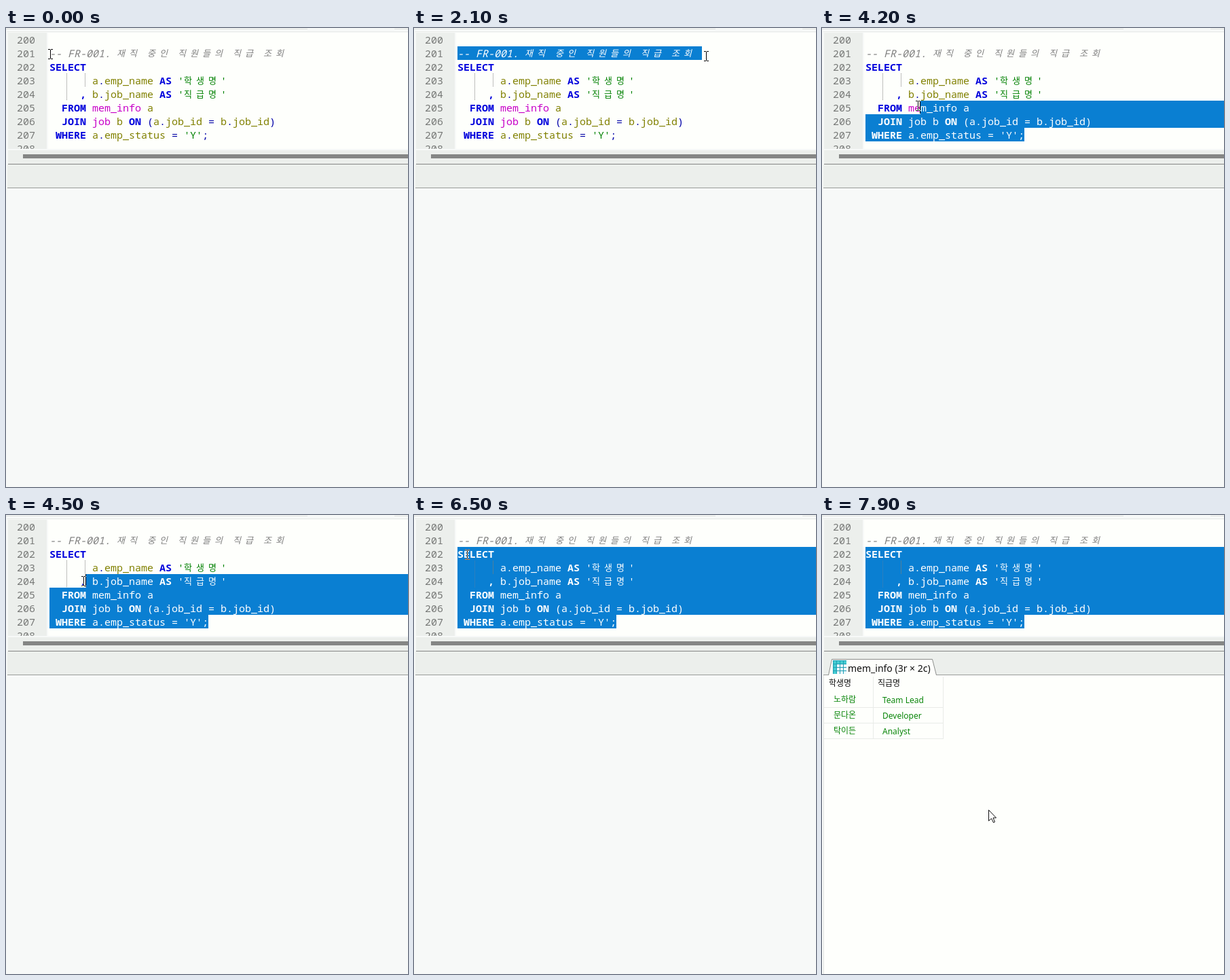
An HTML page with a canvas that plays this animation: 592 by 676 pixels, repeating every 8000 ms.

```html
<!DOCTYPE html>
<html lang="ko">
<head>
<meta charset="utf-8">
<style>
html, body { margin: 0; width: 100%; height: 100%; overflow: hidden; background: #f7f9f8; }
canvas { display: block; }
</style>
</head>
<body>
<canvas id="stage" width="592" height="676"></canvas>
<script>
const ctx = document.getElementById('stage').getContext('2d');
const W = 592, H = 676, LOOP = 8000, STEP = 100;
const LEFT = 64, TOP = 27, CELL = 9, ROW = 20;
const PAPER = '#fefffc', PANEL = '#ecefec', PAGE = '#f7f9f8', BLUE = '#0a7fd2';
const MONO = '"Noto Sans Mono", monospace';
const HANGUL = '"Noto Sans CJK KR", "Noto Sans CJK", sans-serif';
const SANS = '"Noto Sans", "Noto Sans CJK KR", sans-serif';

const code = [
  '-- FR-001. 재직 중인 직원들의 직급 조회 ',
  'SELECT',
  "       a.emp_name AS '학생명'",
  "     , b.job_name AS '직급명'",
  '  FROM mem_info a',
  '  JOIN job b ON (a.job_id = b.job_id)',
  " WHERE a.emp_status = 'Y';"
];
const rows = [['노하람', 'Team Lead'], ['문다온', 'Developer'], ['탁이든', 'Analyst']];

// Pointer stops: time, x, y
const path = [
  [0, 65, 38], [600, 65, 38], [1800, 421, 39], [2000, 430, 41],
  [2650, 430, 41], [3150, 330, 160], [3650, 330, 160], [4200, 141, 114],
  [5000, 57, 59], [5600, 57, 59], [6200, 78, 58], [7250, 78, 58],
  [7800, 245, 434], [LOOP, 245, 434]
];
const CLICK = 3150, DRAG = 3650, DRAG_END = 5000, RESULT = 6900;

const isWide = ch => ch >= '가' && ch <= '힣';
const cols = s => [...s].reduce((n, ch) => n + (isWide(ch) ? 2 : 1), 0);

function box(x, y, w, h, color) {
  ctx.fillStyle = color;
  ctx.fillRect(x, y, w, h);
}

function text(s, x, y, font, color) {
  ctx.font = font;
  ctx.fillStyle = color;
  ctx.fillText(s, x, y);
}

function pointer(t) {
  const i = Math.max(1, path.findIndex(p => p[0] >= t));
  const [t0, x0, y0] = path[i - 1], [t1, x1, y1] = path[i];
  let k = (t - t0) / (t1 - t0);
  k = k * k * (3 - 2 * k);
  return { x: x0 + (x1 - x0) * k, y: y0 + (y1 - y0) * k };
}

function caretAt({ x, y }) {
  const row = Math.max(0, Math.min(code.length - 1, Math.floor((y - TOP) / ROW)));
  const col = Math.max(0, Math.min(cols(code[row]), Math.round((x - LEFT) / CELL)));
  return { row, col };
}

function selection(t) {
  if (t < CLICK) return { from: { row: 0, col: 0 }, to: caretAt(pointer(Math.min(t, 2600))) };
  if (t < DRAG) return null;
  return { from: caretAt(pointer(Math.min(t, DRAG_END))), to: { row: 6, col: 26 } };
}

function style(token) {
  if (token.startsWith('--')) return ['italic', '#808080'];
  if (token[0] === "'") return ['', '#008000'];
  if (/^(SELECT|AS|FROM|JOIN|ON|WHERE)$/.test(token)) return ['bold', '#0000dc'];
  if (/^(mem_info|job)$/.test(token)) return ['', '#c800c8'];
  if (token === ',') return ['bold', '#0000dc'];
  return /\w/.test(token) ? ['', '#808000'] : ['', '#0000a8'];
}

function drawLine(row, selected) {
  const line = code[row], base = TOP + ROW * row + 16;
  for (const m of line.matchAll(/--.*|'[^']*'|\w+|\S/g)) {
    const [face, color] = style(m[0]);
    let x = LEFT + CELL * cols(line.slice(0, m.index));
    for (const ch of m[0]) {
      const wide = isWide(ch);
      text(ch, x, base - (wide ? 1 : 0), face + (wide ? ' 13px ' + HANGUL : ' 15px ' + MONO), selected ? '#fff' : color);
      x += wide ? 2 * CELL : CELL;
    }
  }
}

function guide(x, y, h) {
  for (let i = 0; i < h; i += 2) box(x, y + i, 1, 1, '#808080');
}

function drawSelection({ from, to }) {
  for (let r = from.row; r <= to.row; r++) {
    const x0 = LEFT + CELL * (r === from.row ? from.col : 0);
    const x1 = r === to.row ? LEFT + CELL * to.col : W;
    if (x1 <= x0) continue;
    ctx.save();
    ctx.beginPath();
    ctx.rect(x0, TOP + ROW * r, x1 - x0, ROW);
    ctx.clip();
    box(x0, TOP + ROW * r, x1 - x0, ROW, BLUE);
    if (r === 2 || r === 3) box(89, TOP + ROW * r, 1, ROW, '#2b7fc0');
    if (r === 2) box(116, TOP + ROW * r, 1, ROW, '#4c7f9c');
    drawLine(r, true);
    ctx.restore();
  }
}

function drawEditor(t) {
  box(62, 7, W - 62, 171, PAPER);
  box(3, 7, 57, 171, PANEL);
  ctx.save();
  ctx.beginPath();
  ctx.rect(0, 7, W, 171);
  ctx.clip();
  for (let i = 0; i < 9; i++) text(String(200 + i), 16, 23 + ROW * i, '15px ' + MONO, '#777977');
  guide(89, 67, 40);
  guide(116, 67, 20);
  code.forEach((_, r) => drawLine(r, false));
  const sel = selection(t);
  if (sel) {
    drawSelection(sel);
    const up = t > DRAG && t < DRAG_END, right = t > 600 && t < 1800;
    const at = up ? sel.from : right ? sel.to : null;
    if (at) box(LEFT + CELL * at.col - 1, TOP + ROW * at.row, 1, ROW - 1, '#000');
  }
  ctx.restore();
}

function drawFrame() {
  box(0, 0, W, H, PAGE);
  box(0, 1, 444, 1, '#e0e2e0');
  box(572, 1, 20, 1, '#e0e2e0');
  box(2, 5, W - 2, 1, '#e8eae8');
  box(2, 178, W - 2, 2, PAGE);
  box(3, 180, W - 3, 20, PANEL);
  box(25, 186, W - 25, 6, '#858685');
  box(3, 200, W - 3, 1, '#858685');
  box(2, 201, W - 2, 34, PANEL);
  box(2, 235, W - 2, 1, '#9a9c9a');
}

function drawResult() {
  box(2, 236, W - 2, H - 236, PAPER);
  box(2, 236, 1, H - 236, '#e2e4e2');

  ctx.beginPath();
  ctx.moveTo(9.5, 236);
  ctx.lineTo(14.5, 212.5);
  ctx.lineTo(162.5, 212.5);
  ctx.lineTo(168.5, 236);
  ctx.fillStyle = PAPER;
  ctx.fill();
  ctx.strokeStyle = '#8c8e8c';
  ctx.lineWidth = 1;
  ctx.stroke();

  box(16, 214, 20, 20, '#1f9fb4');
  for (let r = 0; r < 4; r++)
    for (let c = 0; c < 4; c++)
      box(17 + c * 5, 215 + r * 5, 4, 4, r && c ? '#eef8fd' : '#45cdd2');
  text('mem_info (3r × 2c)', 38, 231, '14px ' + SANS, '#111');

  for (const x of [75, 178]) box(x, 238, 1, 92, '#e9ebe8');
  for (let r = 0; r < 3; r++) box(3, 283 + 23 * r, 176, 1, '#e9ebe8');
  text('학생명', 10, 252, '12px ' + HANGUL, '#111');
  text('직급명', 82, 252, '12px ' + HANGUL, '#111');
  rows.forEach(([name, job], r) => {
    text(name, 17, 276 + 23 * r, '12px ' + HANGUL, '#0a860a');
    text(job, 89, 277 + 23 * r, '12px ' + SANS, '#0a860a');
  });
}

function drawBeam(x, y) {
  ctx.save();
  ctx.globalCompositeOperation = 'difference';
  box(x, y - 6, 1, 13, '#fff');
  for (const end of [y - 7, y + 7]) {
    box(x - 3, end, 3, 1, '#fff');
    box(x + 1, end, 3, 1, '#fff');
  }
  ctx.restore();
}

function drawArrow(x, y) {
  const shape = [[0, 0], [0, 16], [4, 12.5], [7, 18.5], [9, 17.5], [6.5, 11.5], [11, 11.5]];
  ctx.beginPath();
  shape.forEach(([dx, dy]) => ctx.lineTo(x + dx + 0.5, y + dy + 0.5));
  ctx.closePath();
  ctx.fillStyle = '#fff';
  ctx.fill();
  ctx.strokeStyle = '#111';
  ctx.lineWidth = 1;
  ctx.stroke();
}

function drawPointer(t) {
  const p = pointer(t), x = Math.round(p.x), y = Math.round(p.y);
  (x >= 62 && y < 178 ? drawBeam : drawArrow)(x, y);
}

function render(now) {
  const t = Math.floor((now % LOOP) / STEP) * STEP;
  drawFrame();
  drawEditor(t);
  if (t >= RESULT) drawResult();
  drawPointer(t);
}

let start = null;
function tick(now) {
  if (start === null) start = now;
  render(now - start);
  requestAnimationFrame(tick);
}
render(0);
requestAnimationFrame(tick);
</script>
</body>
</html>
```
